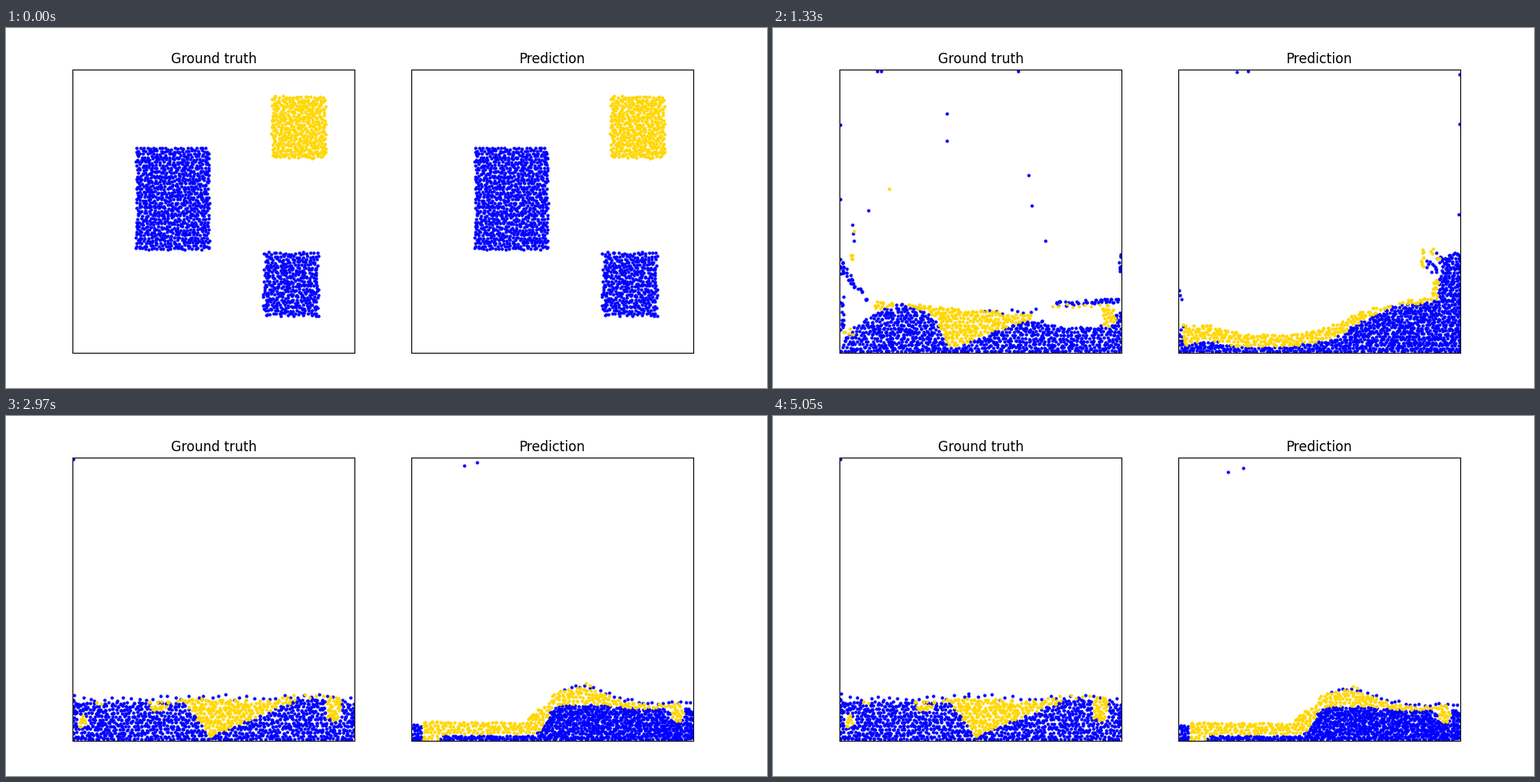
These frames come from a looping animation (950x450 px, 5080 ms). A matplotlib script:

```python
import numpy as np
import matplotlib.pyplot as plt
from matplotlib.animation import FuncAnimation

W, H, DPI = 950, 450, 100
LOOP, TICK = 5080, 20
STEP = LOOP / 152              # one simulation step in ms
SIDE = 352                     # tank size; x runs right, h up from the floor
rng = np.random.default_rng(4)


# ---------- shapes ----------
def sig(x, c, w):
    return 1 / (1 + np.exp(-(x - c) / w))


def bump(x, c, w):
    return np.exp(-((x - c) / w) ** 2)


def blob(x, h, cx, cy, rx, ry, power=2):
    return abs((x - cx) / rx) ** power + abs((h - cy) / ry) ** power < 1


def between(a, lo, hi):
    return (a > lo) & (a < hi)


# ---------- point sets ----------
def grid(gap, jitter):
    """Jittered hexagonal lattice over a whole tank."""
    rows = np.arange(1, SIDE, gap * 0.866)
    x, h = np.meshgrid(np.arange(0, SIDE, gap), rows)
    x = x + (np.arange(len(rows)) % 2)[:, None] * gap / 2
    p = np.column_stack([x.ravel(), h.ravel()])
    return p + rng.uniform(-jitter, jitter, p.shape) * gap


def fill(n, mask, *dots, gap=4.7):
    """n points: the loose dots, then the masked area; spare points double up."""
    p = grid(gap, 0.27)
    p = p[mask(*p.T)]
    dots = np.vstack([np.empty((0, 2)), *dots])
    m = n - len(dots)
    if len(p) > m:
        p = p[rng.choice(len(p), m, replace=False)]
    else:
        spare = p[rng.integers(0, len(p), m - len(p))]
        p = np.vstack([p, spare + rng.normal(0, 0.5, spare.shape)])
    return np.vstack([dots, p])


def spray(n, x0, x1, h0, h1):
    return np.column_stack([rng.uniform(x0, x1, n), rng.uniform(h0, h1, n)])


def crust(level, x0, x1, gap, rough=1.5):
    """Loose dots strung along a curve."""
    x = np.arange(x0, x1, gap) + rng.uniform(-0.3, 0.3, len(np.arange(x0, x1, gap))) * gap
    return np.column_stack([x, level(x) + rng.normal(0, rough, len(x))])


# ---------- pairing and mapping ----------
def kd_order(p, idx=None, axis=0):
    idx = np.arange(len(p)) if idx is None else idx
    if len(idx) < 2:
        return idx
    idx = idx[np.argsort(p[idx, axis], kind="stable")]
    half = len(idx) // 2
    return np.concatenate([kd_order(p, idx[:half], 1 - axis),
                           kd_order(p, idx[half:], 1 - axis)])


def match(p, ref):
    out = np.empty(len(p), int)
    out[kd_order(ref)] = kd_order(p)
    return out


def chain(early, mids, late):
    """Give every point one identity through all the poses."""
    poses = list(late)
    for pose in reversed(mids):
        poses.insert(0, pose[match(pose, poses[0])])
    order = match(early[-1], poses[0])
    return np.array([e[order] for e in early] + poses)


def slosh(p, k):
    """Slow standing wave plus short ripples that die out after step 56."""
    x, h = p.T
    u = np.pi * x / SIDE
    s = 23 * (np.sin(2 * np.pi * (k - 49) / 96) - 0.5)
    ripple = 0.17 * np.exp(-(k - 56) / 12) * np.cos(2 * np.pi * (x - 106) / 160)
    depth = h * (1 - np.pi * s / SIDE * np.cos(u)) * (1 + ripple)
    return np.column_stack([x + s * np.sin(u), depth])


# ---------- falling blocks, shared by both tanks ----------
start = grid(3.9, 0.32)


def block(x, h, w, t):
    p = start[between(start[:, 0], x, x + w) & between(start[:, 1], h, h + t)]
    return p, *((p - (x, h)) / (w, t)).T


big, u, v = block(78, 128, 92, 128)
small, a, b = block(237, 45, 69, 80)
sand0, _, _ = block(247, 242, 68, 78)
NW, NS = len(big) + len(small), len(sand0)

hit = np.column_stack([small[:, 0] + 30 + (a - 0.5) * 14 * (1 - b), b * 58])
pile = np.column_stack([1 + u * (95 + 40 * (1 - v) ** 2),
                        v * (135 - 40 * u + 50 * np.exp(-12 * np.abs(u)))])
wash = np.column_stack([246 + a * 105, b * (25 + 150 * np.clip(a, 0, 1) ** 8)])
EARLY = [0, 5, 10]
water_fall = [np.vstack(q) for q in
              ((big, small), (big + (-45, -66), hit), (pile, wash))]
sand_fall = [sand0 - (6.7 * k, 0.513 * k * k) for k in EARLY]


def wall_film(x, reach, width):
    """Pool heaped against the left wall with a thin film climbing it."""
    return 36 + 57 * np.exp(-x / 28) + reach * np.exp(-x / width)


def slab(x, h, cy):
    return blob(x, h, 149, cy, 42, 33, 5)


def splashes(lo, hi):
    """Drops left on both walls after the first impact."""
    return np.vstack([spray(12, 0, 3, lo, hi)]
                     + [spray(7, 347, 351, c, c + 24) for c in (64, 140, 216, 310)])


# ---------- left tank ----------
def left_tank():
    def jet(x, h):
        return between(x, 155, 268) & between(h, 25 + 0.45 * (x - 162), 42 + 0.32 * (x - 160))

    def water1(x, h):
        pool = (x < 162) & (h < wall_film(x, 110, 3))
        thin = h < 9 + 0.075 * (x - 162) + 14 * np.exp((x - SIDE) / 6)
        return (pool | jet(x, h) | (x > 162) & thin) & ~slab(x, h, 74)

    def sand1(x, h):
        tail = between(x, 185, 210) & between(h, 42 + 0.32 * (x - 160), 68)
        return slab(x, h, 74) | tail

    arc = crust(lambda x: 78 - 0.004 * (x - 300) ** 2, 270, 345, 11, 0.5)
    w1 = fill(NW, water1, splashes(205, 315), spray(9, 5, 330, 350, 352), arc,
              crust(lambda x: 80 - 1.2 * (x - 90), 89, 110, 6))
    s1 = fill(NS, sand1, crust(lambda x: 64 + 0.15 * (x - 220), 220, 268, 8))

    def valley(x, c, steep, gentle):
        return 5 + np.maximum(steep * (c - x), gentle * (x - c))

    def level2(x):
        heap = 30 + 30 * bump(x, 75, 50) + 10 * bump(x, 240, 30)
        return heap * (1 - 0.8 * np.exp(-x / 12)) + 30 * np.exp((x - SIDE) / 14)

    def bed2(x):
        return np.minimum(level2(x), valley(x, 137, 1.9, 0.38))

    def clump2(x, h):
        return blob(x, h, 334, 45, 9, 14)

    def water2(x, h):
        curl = (x < 33) & (abs(h - 107 + 1.25 * x) < 9 - 0.2 * x)
        roof = between(x, 268, SIDE) & (abs(h - 60 - 0.06 * (x - 268)) < 3)
        return ((h < bed2(x)) | curl | roof) & ~clump2(x, h)

    def sand2(x, h):
        layer = between(h, bed2(x), 64 - 0.09 * (x - 41)) & between(x, 41, 238)
        return layer | clump2(x, h)

    w2 = fill(NW, water2, spray(14, 0, 4, 10, 70), spray(8, 348, 351, 97, 129),
              crust(lambda x: 51 + 0 * x, 180, 250, 8),
              [(46, 351), (51, 351), (222, 351), (133, 264), (235, 221),
               (239, 183), (256, 139), (35, 177), (0, 191)],
              crust(lambda x: 158 - 10 * (x - 15), 15, 18, 1))
    s2 = fill(NS, sand2, [(61, 204), (17, 151)], spray(4, 12, 16, 112, 122),
              spray(5, 2, 16, 14, 30), crust(lambda x: 57 + 0 * x, 266, 325, 8))

    def level(x):
        return 46 + 7 * bump(x, 300, 50) + 4 * np.exp(-x / 40)

    def bed(x):
        return np.minimum(level(x), valley(x, 172, 1.3, 0.42))

    def clumps(x, h):
        return (blob(x, h, 325, 41, 10, 17) | blob(x, h, 11, 24, 5, 9)
                | blob(x, h, 32, 46, 6, 4) | blob(x, h, 108, 41, 11, 5))

    def sand4(x, h):
        return between(h, bed(x), level(x) + 6 * bump(x, 172, 60)) | clumps(x, h)

    w4 = fill(NW, lambda x, h: (h < bed(x)) & ~clumps(x, h),
              crust(lambda x: level(x) + 4 + 5 * bump(x, 172, 60), 2, 350, 9))
    s4 = fill(NS, sand4, crust(lambda x: level(x) + 3, 260, 320, 9))

    late = list(range(56, 152, 19))
    water = chain(water_fall, [w1, w2], [slosh(w4, k) for k in late])
    sand = chain(sand_fall, [s1, s2], [slosh(s4, k) for k in late])
    stray = [([0, 20, 40, 56, 75], [(130, 200), (60, 20), (133, 298), (145, 323), (160, 58)]),
             ([0, 20, 40, 56], [(90, 200), (1, 279), (0, 284), (0, 351)])]
    return EARLY + [20, 40] + late, water, sand, stray


# ---------- right tank ----------
def right_tank():
    def water1(x, h):
        pool = (x < 158) & (h < wall_film(x, 80, 5))
        top = np.minimum(43 + 0.015 * np.clip(x - 133, 0, None) ** 2, 122)
        jet = between(x, 133, 231) & between(h, np.minimum(30 + 1.18 * (x - 158), 97), top)
        thin = (x > 158) & (h < 7 + 0.08 * (x - 158))
        return (pool | jet | thin) & ~slab(x, h, 145)

    def sand1(x, h):
        return slab(x, h, 145) | between(x, 180, 229) & between(
            h, 114 + 0.1 * (x - 180), 142 - 0.4 * (x - 180))

    w1 = fill(NW, water1, splashes(170, 288), spray(14, 0, 6, 130, 190),
              crust(lambda x: 114 + 0 * x, 120, 188, 9, 0.5), [(223, 82)], gap=4.5)
    s1 = fill(NS, sand1, spray(5, 103, 107, 120, 168), gap=4.5)

    def base2(x):
        return (7 + 8 * bump(x, 35, 22) + 56 * sig(x, 222, 22)
                + 62 * sig(x, 325, 3))

    def top2(x):
        return base2(x) + 16 + 12 * np.exp(-x / 30) - 11 * sig(x, 235, 8)

    def lip(x, h):
        return between(x, 315, 323) & between(h, 66, 92)

    w2 = fill(NW, lambda x, h: (h < base2(x)) & ~lip(x, h),
              spray(12, 0, 6, 3, 33), spray(3, 0, 3, 65, 78),
              spray(18, 306, 330, 98, 126), [(351, 347), (350, 285), (349, 172)],
              gap=4.2)
    s2 = fill(NS, lambda x, h: between(h, base2(x), top2(x)) & between(x, 5, 318) | lip(x, h),
              spray(9, 301, 306, 107, 128), spray(5, 312, 326, 115, 131))

    def settled(base, thick, clump):
        def water(x, h):
            return ((h < base(x)) & (x > 35) | (x < 13) & (h < 20)) & ~clump(x, h)

        def sand(x, h):
            lo = base(x) * (x > 35)
            return between(h, lo, base(x) + thick(x)) & between(x, 13, 335) | clump(x, h)
        return water, sand

    def base3(x):
        return 7 + 57 * sig(x, 218, 17) - 26 * np.exp((x - SIDE) / 15)

    def ridge(x):
        return 82 - 0.004 * (x - 280) ** 2

    water3, sand3 = settled(base3, lambda x: 16 - 6 * sig(x, 260, 8),
                            lambda x, h: x < 0)
    w3 = fill(NW, water3, crust(ridge, 235, 335, 2, 3), [(351, 312)], gap=4)
    s3 = fill(NS, sand3, crust(ridge, 232, 320, 13, 2))

    def base4(x):
        return 7 + 38 * sig(x, 168, 5) - 6 * sig(x, 260, 10)

    def thick4(x):
        return (17 + 4 * bump(x, 210, 20) + 12 * bump(x, 157, 10)
                - 11 * sig(x, 245, 8))

    water4, sand4 = settled(base4, thick4, lambda x, h: blob(x, h, 331, 33, 9, 9))
    w4 = fill(NW, water4, crust(lambda x: base4(x) + thick4(x) + 2, 192, 350, 6), gap=4)
    s4 = fill(NS, sand4, [(217, 71), (222, 68)])

    def settle(fall, mids, last):
        k = chain(fall, mids, [last, last * (1, 0.95)])
        return np.insert(k, 6, 0.25 * k[5] + 0.75 * k[6], axis=0)

    water = settle(water_fall, [w1, w2, w3], w4)
    sand = settle(sand_fall, [s1, s2, s3], s4)
    steps = [0, 20, 40, 56, 151]
    stray = [(steps, [(93, 205), (74, 277), (72, 350), (68, 347), (61, 335)]),
             (steps, [(113, 205), (83, 254), (86, 351), (82, 350), (80, 340)])]
    return EARLY + [20, 40, 56, 68, 89, 151], water, sand, stray


# ---------- motion ----------
class Flow:
    """Cubic Hermite path through a series of poses, kept in its tank."""

    def __init__(self, steps, poses):
        self.t, self.p = np.array(steps, float), poses
        self.v = np.gradient(poses, self.t, axis=0, edge_order=2)
        self.v[-1] = 0

    def at(self, t):
        i = min(np.searchsorted(self.t, t, "right") - 1, len(self.t) - 2)
        span = self.t[i + 1] - self.t[i]
        s = min((t - self.t[i]) / span, 1)
        q = ((1 + 2 * s) * (1 - s) ** 2 * self.p[i]
             + s * (1 - s) ** 2 * span * self.v[i]
             + s * s * (3 - 2 * s) * self.p[i + 1]
             + s * s * (s - 1) * span * self.v[i + 1])
        return np.clip(q, (0, 1), (350, 352)).T


def with_strays(steps, poses, stray):
    loose = [np.column_stack([np.interp(steps, t, c) for c in np.transpose(pts)])
             for t, pts in stray]
    return np.concatenate([poses, np.stack(loose, axis=1)], axis=1)


# ---------- figure ----------
plt.rcParams["font.family"] = "DejaVu Sans"
fig = plt.figure(figsize=(W / DPI, H / DPI), dpi=DPI, facecolor="white")
artists = []


def panel(left, title, tank):
    ax = fig.add_axes([left / W, 44.5 / H, 352.2 / W, 353 / H])
    ax.set(xlim=(-1, 351.2), ylim=(-0.5, 352.5), xticks=[], yticks=[])
    ax.set_title(title, fontsize=12)
    steps, water, sand, stray = tank
    for poses, color in ((with_strays(steps, water, stray), "blue"), (sand, "gold")):
        line, = ax.plot([], [], "o", ms=2, color=color)
        artists.append((line, Flow(steps, poses)))


panel(83.1, "Ground truth", left_tank())
panel(505.9, "Prediction", right_tank())


def draw(i):
    step = round((i * TICK + 4) / STEP)
    for line, flow in artists:
        line.set_data(*flow.at(step))
    return [line for line, _ in artists]


anim = FuncAnimation(fig, draw, frames=LOOP // TICK, interval=TICK,
                     repeat=True, repeat_delay=0, blit=False)
plt.show()
```
